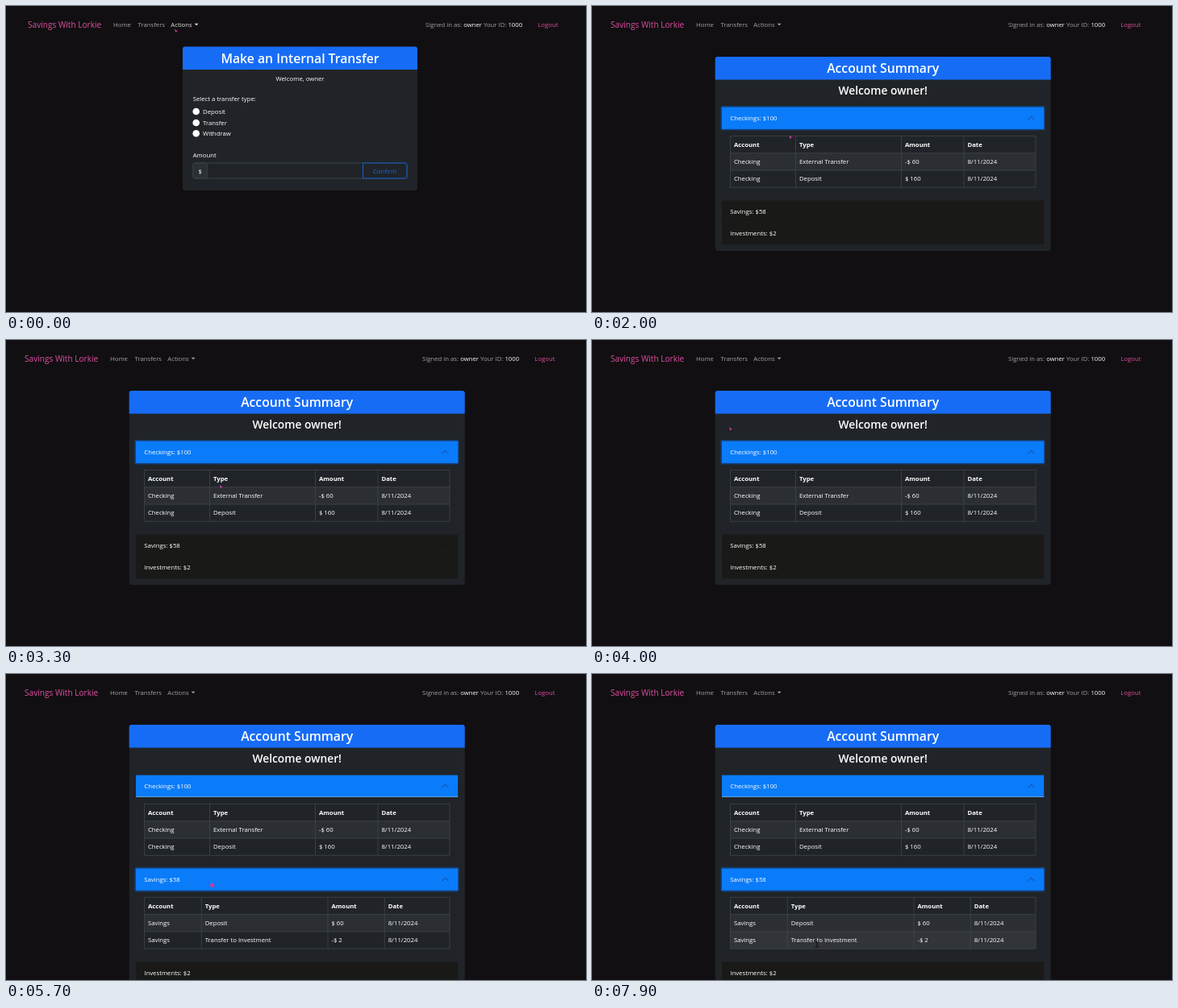
Write an HTML page that moves like this. It is 719x380 px and loops after 8000 ms.

```html
<!DOCTYPE html>
<html lang="en">
<head>
<meta charset="utf-8">
<title>Account summary</title>
<style>
  html, body { margin: 0; width: 100%; height: 100%; overflow: hidden; background: #110f11; }
  svg { display: block; }
  text { font: 500 7.75px "Open Sans", "Noto Sans", sans-serif; fill: #fff; }
  .title { font-size: 15.75px; font-weight: 600; text-anchor: middle; }
  .sub { font-size: 13.8px; font-weight: 600; text-anchor: middle; }
  .mid { text-anchor: middle; }
  .bold { font-weight: 700; }
  .brand { font-size: 10.1px; fill: #e04ea5; }
  .pink { fill: #e04ea5; }
  .dim { fill: #a2a2a4; }
  .blue { fill: #1668e4; }
  .status { font-size: 5px; fill: #3a4042; }
</style>
</head>
<body>
<svg id="stage" width="719" height="380" viewBox="0 0 719 380"></svg>
<script>
const LOOP = 8000;
const BODY = 88.6;
const stage = document.getElementById('stage');

const text = (x, y, value, cls = '', id = '') =>
  `<text x="${x}" y="${y}" class="${cls}" id="${id}">${value}</text>`;
const rect = (x, y, w, h, fill, more = '') =>
  `<rect x="${x}" y="${y}" width="${w}" height="${h}" fill="${fill}" ${more}/>`;
const card = (x, y, w, h, id) =>
  rect(x, y, w, h, '#202428', `rx="3.5" id="${id}"`) +
  `<path d="M${x} ${y + 28.6}v-25.6q0 -3 3 -3h${w - 6}q3 0 3 3v25.6z" fill="#176cf6"/>`;

const nav = `<g id="nav">
  ${text(27, 26.7, 'Savings With Lorkie', 'brand')}
  ${text(133, 26, 'Home', 'dim', 'homeLink')}
  ${text(163.5, 26, 'Transfers', 'dim')}
  ${text(204.3, 26, 'Actions', 'dim', 'actions')}
  <path id="caret" d="M233.7 21.8h4.8l-2.4 2.5z" fill="#a2a2a4"/>
  <text x="520" y="26" class="dim">Signed in as: <tspan fill="#fff">owner</tspan> Your ID: <tspan fill="#fff">1000</tspan></text>
  ${text(659.3, 26, 'Logout', 'pink')}
</g>`;

const radio = (y, label) =>
  `<circle cx="235.7" cy="${y}" r="4.3" fill="#fff"/>` + text(244, y + 3, label);

const transferPage = `<g id="transferPage">
  ${card(219, 50.5, 291, 178.5, 'transferCard')}
  ${text(364.5, 71, 'Make an Internal Transfer', 'title')}
  ${text(364.5, 92.8, 'Welcome, owner', 'mid')}
  ${text(231.7, 117.6, 'Select a transfer type:')}
  ${radio(131, 'Deposit') + radio(145, 'Transfer') + radio(158.2, 'Withdraw')}
  ${text(231.7, 187.7, 'Amount')}
  ${rect(232, 195, 265, 19, '#202428', 'rx="2.5" stroke="#41474d" stroke-width=".8"')}
  ${rect(232, 195, 17.3, 19, '#2b3035', 'rx="2.5" stroke="#41474d" stroke-width=".8"')}
  ${text(240.6, 207.8, '$', 'mid')}
  <path d="M442.5 195h52q2.5 0 2.5 2.5v14q0 2.5 -2.5 2.5h-52z" fill="#202428" stroke="#1668e4" stroke-width=".9"/>
  ${text(469.6, 207.8, 'Confirm', 'mid blue')}
</g>`;

// Tables are laid out relative to the top of their accordion body.
function table(key, columns, rows) {
  const top = 8.5, step = 21.3;
  const cells = rows.map((row, r) => row.map((value, c) =>
    text(columns[c] + 4.4, top + step * r + 13.4, value, r ? '' : 'bold')).join('')).join('');
  const stripes = [1, 2].map(r =>
    rect(171.5, top + step * r, 378.5, step, 'none', `id="${key}Row${r}"`)).join('');
  const lines = columns.concat(550).map(x => `M${x} ${top}v${step * 3}`).join('') +
    [0, 1, 2, 3].map(r => `M171.5 ${top + step * r}h378.5`).join('');
  return stripes + `<path d="${lines}" fill="none" stroke="#41464b" stroke-width=".8"/>` + cells;
}

const panel = (key, label, content) => `<g id="${key}">
  <svg id="${key}Body" x="0" y="27.3" width="719" height="0" overflow="hidden">${content}</svg>
  ${rect(160.2, -.8, 400.6, 28.9, 'none', `id="${key}Ring" rx="1.5" stroke="#153f78" stroke-width="1.8"`)}
  ${rect(161, 0, 399.2, 27.3, '#191918', `id="${key}Head"`)}
  ${rect(161, 26.7, 399.2, .7, '#8fb4dc', `id="${key}Line"`)}
  <path id="${key}Arrow" d="M-4 -2L0 2L4 -2" fill="none" stroke-width="1.1"/>
  ${text(171.3, 16.7, label)}
</g>`;

const head = ['Account', 'Type', 'Amount', 'Date'];
const date = '8/11/2024';
const summaryPage = `<g id="summaryPage">
  ${card(152.7, 62.9, 416, 152.5, 'summaryCard')}
  ${text(360.7, 83.4, 'Account Summary', 'title')}
  ${text(360.7, 110, 'Welcome owner!', 'sub')}
  ${panel('checking', 'Checkings: $100', table('checking', [171.5, 252.5, 383.5, 461], [
    head, ['Checking', 'External Transfer', '-$ 60', date], ['Checking', 'Deposit', '$ 160', date]]))}
  ${panel('savings', 'Savings: $58', table('savings', [171.5, 242.3, 399, 469.3], [
    head, ['Savings', 'Deposit', '$ 60', date], ['Savings', 'Transfer to Investment', '-$ 2', date]]))}
  ${panel('investments', 'Investments: $2', '')}
</g>`;

stage.innerHTML = rect(0, 0, 719, 380, '#110f11') + nav + transferPage + summaryPage +
  `<g id="status">${rect(0, 371, 42.5, 9, '#1f2628', 'rx="1"')}${text(5, 377.5, 'local / home', 'status')}</g>
  <path id="cursor"/>`;

const el = {};
stage.querySelectorAll('[id]').forEach(node => { if (node.id) el[node.id] = node; });
const set = (id, attrs) => {
  for (const name in attrs) el[id].setAttribute(name, attrs[name]);
};
const show = (id, on) => set(id, { visibility: on ? 'inherit' : 'hidden' });

const clamp = v => Math.max(0, Math.min(1, v));
const ease = v => { v = clamp(v); return v * v * (3 - 2 * v); };
const mix = (a, b, p) => a + (b - a) * p;
const blend = (a, b, p) => `rgb(${a.map((v, i) => Math.round(mix(v, b[i], p)))})`;

// time, x, y
const path = [
  [0, 209, 28.5], [300, 143, 24], [600, 142, 24], [1000, 180, 136], [1500, 196, 139],
  [1900, 228, 150], [2200, 290, 190], [2500, 245, 204.5], [3000, 320, 202], [3500, 235, 168],
  [4000, 170, 108], [4500, 186, 180], [5000, 215, 255], [5300, 216, 256.5], [5700, 255, 262],
  [6100, 382, 300], [6400, 424, 311], [6600, 419, 322], [7200, 335, 328], [7900, 279, 336],
  [8000, 279, 336]
];
function pointer(t) {
  const i = Math.max(1, path.findIndex(k => k[0] > t));
  const [a, b] = [path[i - 1], path[i]];
  const p = ease((t - a[0]) / (b[0] - a[0]));
  return [mix(a[1], b[1], p), mix(a[2], b[2], p)];
}

const shapes = {
  arrow: 'M0 0L4 3L2.3 3.2L1.3 4.6Z',
  hand: 'M0 -3.6L1.4 -1.5L3.8 .3L.6 3.6L-2.8 .6L-1 -.7Z',
  beam: 'M-2 -3H2M0 -3V3M-2.4 3H2.4'
};

function drawPanel(key, y, clickTime, t, focused) {
  const open = ease((t - clickTime) / 350);
  const tint = clamp((t - clickTime) / 150);
  set(key, { transform: `translate(0 ${y})` });
  set(key + 'Body', { height: open * BODY });
  set(key + 'Head', { fill: blend([25, 25, 24], [10, 124, 249], tint) });
  set(key + 'Arrow', {
    transform: `translate(544.5 13.6) rotate(${-180 * clamp((t - clickTime) / 200)})`,
    stroke: blend([22, 22, 22], [14, 88, 194], tint)
  });
  show(key + 'Ring', focused);
  show(key + 'Line', tint === 1 && !focused);
  return open * BODY;
}

function drawRows(key, top, y) {
  for (const r of [1, 2]) {
    const start = top + 37 + 21.3 * r;
    const hover = y >= start && y < start + 21.3;
    set(key + 'Row' + r, { fill: hover ? '#313438' : r === 1 ? '#2b2f33' : '#202428' });
  }
}

function draw(t) {
  const home = t >= 550;
  const [x, y] = pointer(t);
  set('nav', { transform: `translate(${home ? -4 : 0} 0)` });
  show('transferPage', !home);
  show('summaryPage', home);
  const onHome = t >= 250 && t < 1100;
  const onActions = t < 120;
  show('status', onHome);
  el.homeLink.style.fill = onHome ? '#e8e8e9' : '#a2a2a4';
  el.actions.style.fill = onActions ? '#e0e0e1' : '#a2a2a4';
  set('caret', { fill: onActions ? '#e0e0e1' : '#a2a2a4' });

  const first = drawPanel('checking', 125.6, 1550, t, t >= 1500 && t < 5150);
  const savingsTop = 152.9 + first;
  const second = drawPanel('savings', savingsTop, 5250, t, t >= 5250);
  drawPanel('investments', 180.2 + first + second, Infinity, t, false);
  set('summaryCard', { height: 152.5 + first + second });
  drawRows('checking', 125.6, y);
  drawRows('savings', savingsTop, y);

  const overHead = t > 200 && t < 1900 || t > 4850 && t < 5750;
  const mode = overHead ? 'hand' : t > 6250 ? 'beam' : 'arrow';
  const beam = mode === 'beam';
  set('cursor', {
    d: shapes[mode],
    transform: `translate(${x} ${y})`,
    fill: beam ? 'none' : '#d936a0',
    stroke: beam ? blend([120, 15, 75], [12, 12, 14], clamp((t - 6400) / 600)) : 'none',
    'stroke-width': 1
  });
}

const began = performance.now();
function tick() {
  draw((performance.now() - began) % LOOP);
  requestAnimationFrame(tick);
}
tick();
</script>
</body>
</html>
```
